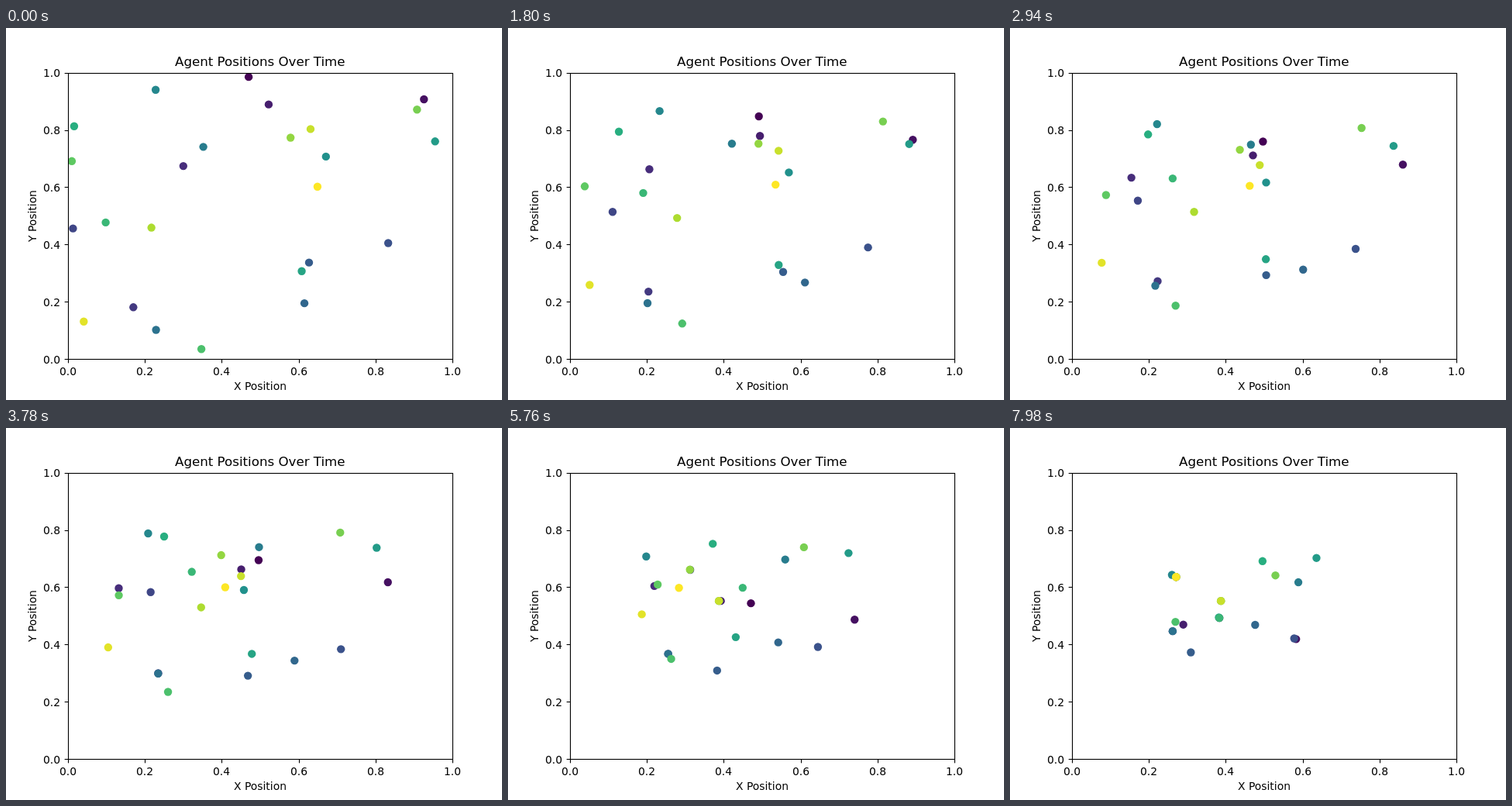
Recreate the animation shown at these times as an HTML page with a canvas. Size 640 px wide and 480 px high, loop 8000 ms.

```html
<!DOCTYPE html>
<html lang="en">
<head>
<meta charset="utf-8">
<title>Agent Positions Over Time</title>
<style>
  html, body { margin: 0; height: 100%; overflow: hidden; background: #fff; }
  canvas { display: block; }
</style>
</head>
<body>
<canvas id="stage" width="640" height="480"></canvas>
<script>
const ctx = document.getElementById('stage').getContext('2d');
const STEP_MS = 60, LOOP_MS = 8000, RADIUS = 5.2;
const plot = { left: 80, top: 57.6, width: 496, height: 369.6 };
const px = x => plot.left + plot.width * x;
const py = y => plot.top + plot.height * (1 - y);

// Starting state only: x, y, index of the chased agent, speed (thousandths per step).
const agents = [
  [.470, .985, 14, 4.64], [.926, .907, 6, 4.85], [.522, .889, 17, 3.78], [.300, .674, 18, 3.16], [.170, .181, 20, 2.15],
  [.013, .456, 20, 3.79], [.833, .405, 23, 1.99], [.627, .337, 9, 2.66], [.615, .195, 22, 2.42], [.229, .102, 4, 3.31],
  [.352, .741, 1, 2.34], [.228, .940, 3, 2.49], [.671, .707, 21, 3.86], [.955, .760, 3, 2.44], [.608, .307, 5, 2.29],
  [.016, .813, 10, 3.76], [.098, .477, 0, 4.62], [.347, .035, 5, 3.50], [.010, .691, 5, 3.14], [.908, .871, 16, 3.42],
  [.579, .773, 18, 3.04], [.217, .459, 12, 2.34], [.631, .803, 21, 3.88], [.041, .131, 5, 4.30], [.649, .602, 18, 3.82]
].map(([x, y, quarry, speed]) => ({ x, y, quarry, speed: speed / 1000 }));

const viridis = ['440154', '472d7b', '3b528b', '2c728e', '21918c', '28ae80', '5ec962', 'addc30', 'fde725']
  .map(hex => [0, 2, 4].map(i => parseInt(hex.slice(i, i + 2), 16)));

function colorAt(u) {
  const p = u * (viridis.length - 1);
  const k = Math.min(Math.floor(p), viridis.length - 2);
  return `rgb(${viridis[k].map((c, i) => Math.round(c + (viridis[k + 1][i] - c) * (p - k)))})`;
}

// Agents move one after another, straight at their quarry, and stop on top of it.
function advance(current) {
  const next = current.map(agent => ({ ...agent }));
  for (const agent of next) {
    const dx = next[agent.quarry].x - agent.x;
    const dy = next[agent.quarry].y - agent.y;
    const part = Math.min(1, agent.speed / (Math.hypot(dx, dy) || 1));
    agent.x += dx * part;
    agent.y += dy * part;
  }
  return next;
}

const history = [agents];
while (history.length * STEP_MS < LOOP_MS) history.push(advance(history.at(-1)));

const crisp = v => Math.round(v) + 0.5;

function setFont(size) {
  ctx.font = `${size}px "DejaVu Sans", sans-serif`;
}

// Aligns by advance width (0.5 centre, 1 right), then snaps the first glyph's ink to whole pixels.
function text(str, x, y, align = 0.5) {
  const { width, actualBoundingBoxLeft } = ctx.measureText(str);
  const bearing = -actualBoundingBoxLeft;
  ctx.fillText(str, Math.round(x - width * align + bearing) - Math.floor(bearing), y);
}

function line(x1, y1, x2, y2) {
  ctx.beginPath();
  ctx.moveTo(x1, y1);
  ctx.lineTo(x2, y2);
  ctx.stroke();
}

function drawAxes() {
  const left = crisp(px(0)), right = crisp(px(1));
  const top = crisp(py(1)), bottom = crisp(py(0));
  ctx.fillStyle = ctx.strokeStyle = '#000';
  ctx.lineWidth = 1.11;
  ctx.strokeRect(left, top, right - left, bottom - top);
  setFont(13.89);
  for (let i = 0; i <= 5; i++) {
    const value = i / 5, label = value.toFixed(1);
    const x = px(value), y = py(value);
    line(crisp(x), bottom, crisp(x), bottom + 4.86);
    line(left, crisp(y), left - 4.86, crisp(y));
    text(label, x, 448);
    text(label, 70.28, Math.round(y + 5.3), 1);
  }
  text('X Position', px(0.5), 467);
  ctx.save();
  ctx.translate(39, 243);
  ctx.rotate(-Math.PI / 2);
  text('Y Position', 0, 0);
  ctx.restore();
  setFont(16.67);
  text('Agent Positions Over Time', px(0.5), 49);
}

function drawAgents(current) {
  ctx.save();
  ctx.beginPath();
  ctx.rect(plot.left, plot.top, plot.width, plot.height);
  ctx.clip();
  current.forEach(({ x, y }, i) => {
    ctx.fillStyle = colorAt(i / (current.length - 1));
    ctx.beginPath();
    ctx.arc(px(x), py(y), RADIUS, 0, 2 * Math.PI);
    ctx.fill();
  });
  ctx.restore();
}

function frame() {
  const step = Math.floor(performance.now() % LOOP_MS / STEP_MS);
  ctx.fillStyle = '#fff';
  ctx.fillRect(0, 0, 640, 480);
  drawAgents(history[step]);
  drawAxes();
  requestAnimationFrame(frame);
}
frame();
</script>
</body>
</html>
```
